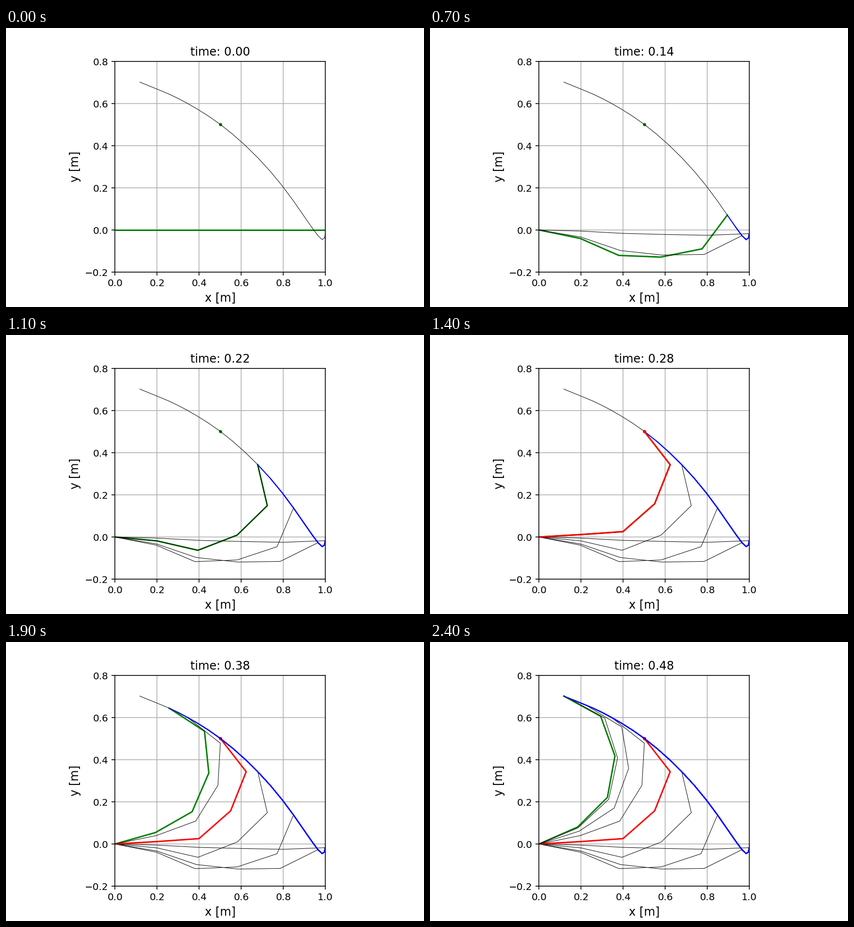
Recreate the animation shown at these times as a matplotlib script. Size 864 by 576 pixels, loop 2500 ms.

```python
import numpy as np
import matplotlib.pyplot as plt
from matplotlib.animation import FuncAnimation

FRAMES = 25
DT = 0.02
LINK = 0.2
VIA = 14                    # step at which the tip passes the via point
KEPT = range(2, FRAMES, 3)  # steps whose pose stays on the plot

# Absolute link angles in degrees at a few steps, one row per link.
STEPS = np.array([0, 2, 4, 5, 7, 8, 11, 14, 17, 19, 20, 23, 24])
ANGLES = np.array([
    [0, -1.5, -7.3, -9.5, -11.6, -11.2, -5.3, 3.3, 11.5, 15.8, 17.7, 22.4, 23.7],
    [0, -3.1, -14.0, -18.8, -23.7, -23.0, -12.9, 4.0, 20.2, 29.6, 33.4, 42.9, 44.8],
    [0, -1.5, -5.6, -6.2, -2.3, 2.3, 21.2, 41.3, 58.2, 66.6, 70.0, 77.9, 79.7],
    [0, -1.1, -1.3, 0.9, 11.3, 18.3, 44.3, 68.3, 86.7, 95.9, 99.5, 107.8, 109.8],
    [0, 2.2, 15.1, 26.4, 53.2, 67.0, 103.2, 127.9, 142.0, 147.0, 148.8, 151.3, 151.3],
])


def spline(t, knots, values):
    """Cubic spline with zero slope at the start and a natural end."""
    h = np.diff(knots)
    slope = np.diff(values) / h
    n = len(knots)
    a, b = np.zeros((n, n)), np.zeros(n)
    a[0, :2], b[0] = (2 * h[0], h[0]), 6 * slope[0]
    for i in range(1, n - 1):
        a[i, i - 1:i + 2] = h[i - 1], 2 * (h[i - 1] + h[i]), h[i]
        b[i] = 6 * (slope[i] - slope[i - 1])
    a[-1, -1] = 1
    m = np.linalg.solve(a, b)
    i = np.clip(np.searchsorted(knots, t, side="right") - 1, 0, n - 2)
    u, v = t - knots[i], knots[i + 1] - t
    return ((m[i] * v**3 + m[i + 1] * u**3) / (6 * h[i])
            + (values[i] / h[i] - m[i] * h[i] / 6) * v
            + (values[i + 1] / h[i] - m[i + 1] * h[i] / 6) * u)


steps = np.arange(FRAMES)
theta = np.radians([spline(steps, STEPS, row) for row in ANGLES])
joint_x = np.vstack([np.zeros(FRAMES), np.cumsum(LINK * np.cos(theta), axis=0)])
joint_y = np.vstack([np.zeros(FRAMES), np.cumsum(LINK * np.sin(theta), axis=0)])
tip_x, tip_y = joint_x[-1], joint_y[-1]

fig = plt.figure(figsize=(6, 4), dpi=144, facecolor="white")
fig.subplots_adjust(left=0.125, right=0.9, bottom=0.125, top=0.88)
ax = fig.add_subplot()
ax.set_aspect("equal")
ax.set(xlim=(0, 1), ylim=(-0.2, 0.8))
ax.set_xticks(np.arange(6) * 0.2)
ax.set_yticks(np.arange(-1, 5) * 0.2)
ax.set_xlabel("x [m]", fontsize=12)
ax.set_ylabel("y [m]", fontsize=12)
ax.grid(True)
title = ax.set_title("time: 0.00", fontsize=12)


def dot(color):
    return ax.plot(tip_x[VIA], tip_y[VIA], "o", color=color, ms=2.3)[0]


def pose(k, color, width):
    return ax.plot(joint_x[:, k], joint_y[:, k], color=color, lw=width)[0]


arm = pose(0, "green", 1.5)
dot("green")
ax.plot(tip_x, tip_y, color="black", lw=0.5)

# Artists that appear at a given step and then stay.
trail = []
for k in steps:
    trail.append((k, ax.plot(tip_x[:k + 1], tip_y[:k + 1], color="blue", lw=1)[0]))
    if k == VIA:
        trail += [(k, pose(k, "red", 1.5)), (k, dot("red"))]
    elif k in KEPT:
        trail.append((k, pose(k, "black", 0.5)))


def update(n):
    title.set_text(f"time: {n * DT:.2f}")
    arm.set_data(joint_x[:, n], joint_y[:, n])
    for k, artist in trail:
        artist.set_visible(bool(k <= n))
    return [title, arm] + [artist for _, artist in trail]


anim = FuncAnimation(fig, update, frames=FRAMES, interval=100, repeat=True,
                     repeat_delay=0, blit=False)
plt.show()
```
